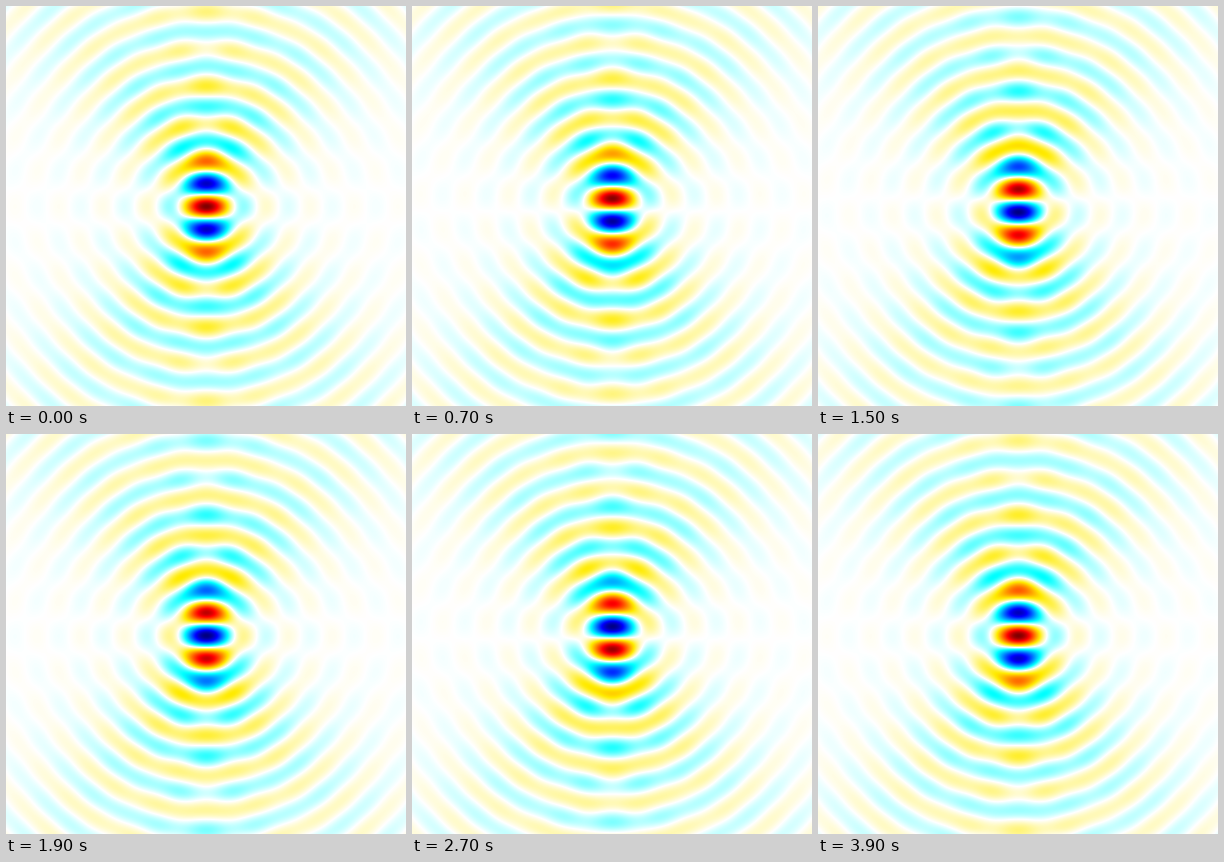
Animation of 400x400 px, one loop 4 s. Source, as a matplotlib script:

```python
import numpy as np
import matplotlib.pyplot as plt
from matplotlib.animation import FuncAnimation
from matplotlib.colors import LinearSegmentedColormap

SIZE = 400
FRAMES = 40
INTERVAL = 100
WAVELENGTH = 37.2   # pixels
APERTURE = 0.85     # sine of the widest ray angle

CMAP = LinearSegmentedColormap.from_list("wave", [
    (0, "#000080"), (1 / 8, "#0000ff"), (3 / 8, "#00ffff"), (1 / 2, "white"),
    (5 / 8, "#ffeb00"), (7 / 8, "#ff0000"), (1, "#800000"),
], N=1024)


def bessel(order, x):
    """Even-order Bessel function from its integral form."""
    phi = (np.arange(120) + 0.5) * np.pi / 120
    return np.cos(order * phi - x[..., None] * np.sin(phi)).mean(axis=-1)


def focused_field():
    """Transverse field of a polarised wave focused by a wide lens."""
    k = 2 * np.pi / WAVELENGTH
    nodes, weights = np.polynomial.legendre.leggauss(100)
    edge = np.sqrt(1 - APERTURE**2)
    cos = (1 + edge + (1 - edge) * nodes) / 2
    sin = np.sqrt(1 - cos**2)
    weights = weights * np.sqrt(cos)
    weights /= (weights * (1 + cos)).sum()

    pos = np.arange(SIZE) - SIZE / 2
    reach = k * np.outer(sin, pos)
    across = ((1 + cos)[:, None] * bessel(0, reach)
              + (1 - cos)[:, None] * bessel(2, reach))
    along = np.exp(-1j * k * np.outer(pos, cos))
    return (along * weights) @ across


field = focused_field()

fig = plt.figure(figsize=(4, 4), dpi=100)
ax = fig.add_axes([0, 0, 1, 1])
ax.set_axis_off()
image = ax.imshow(field.real, cmap=CMAP, vmin=-1, vmax=1,
                  interpolation="nearest", aspect="auto")


def update(frame):
    phase = 2 * np.pi * frame / FRAMES
    image.set_data((field * np.exp(-1j * phase)).real)
    return (image,)


anim = FuncAnimation(fig, update, frames=FRAMES, interval=INTERVAL,
                     repeat=True, repeat_delay=0, blit=False)
plt.show()
```
